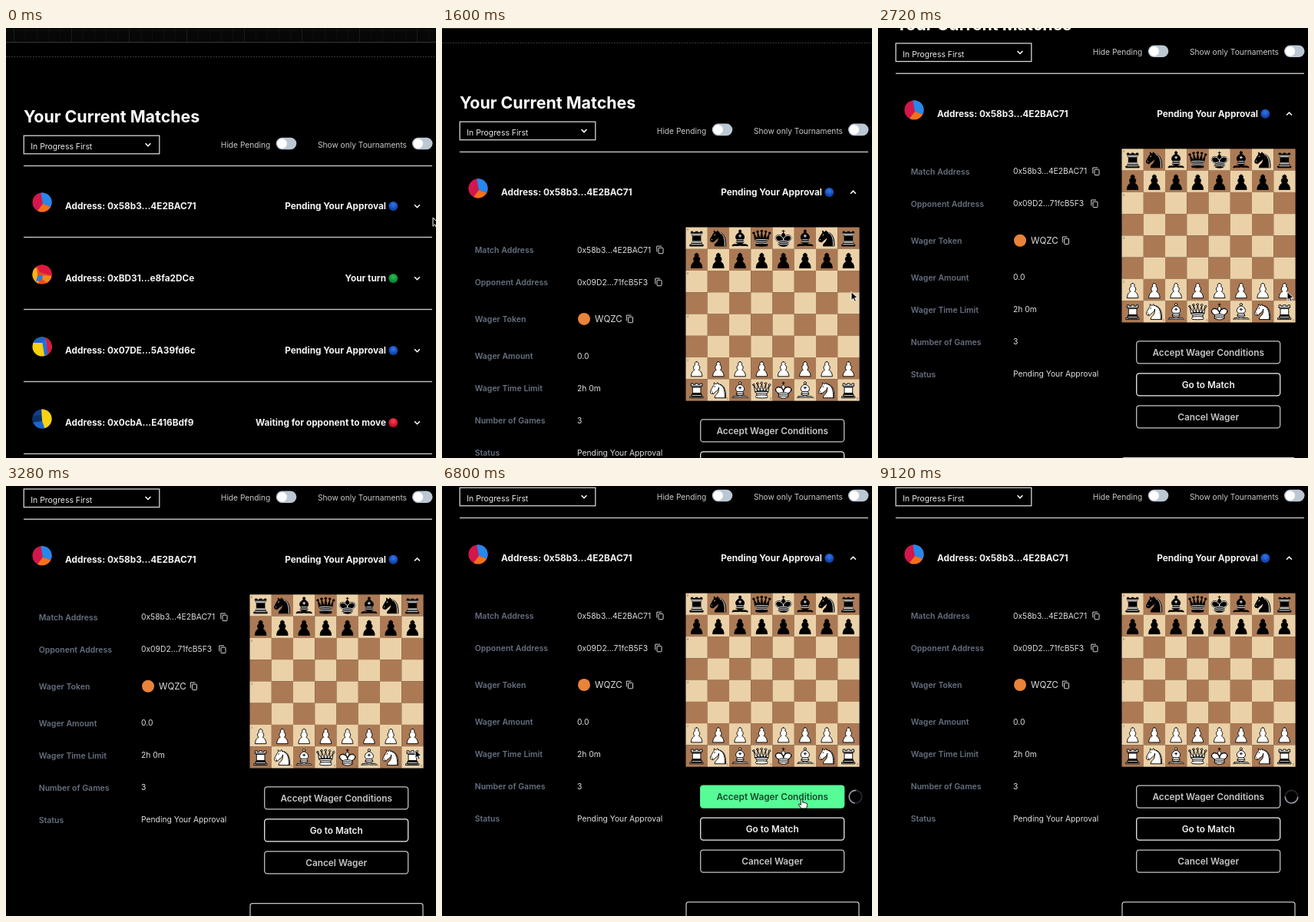
These frames come from a looping animation (560 by 560 pixels, 9200 ms). An HTML page:

```html
<!DOCTYPE html>
<html lang="en">
<head>
<meta charset="utf-8">
<title>Current matches</title>
<style>
  html, body { margin: 0; width: 100%; height: 100%; overflow: hidden; background: #000; }
  svg { display: block; width: 560px; height: 560px; font-family: Inter, sans-serif; }
</style>
</head>
<body>
<svg id="stage" viewBox="0 0 560 560"></svg>
<script>
const LOOP = 9200;
const PANEL_HEIGHT = 500;
const OPEN_AT = 640, OPEN_TIME = 260;
const SPINNER_AT = 5900, SPIN_TIME = 490;
const BOARD = { x: 317.5, y: 277.6, cell: 28.25 };
const BORDER = 1.25;

// Keyframes: [time, ...values]
const scrollKeys = [[1400, 0], [1600, 18], [2080, 62.5], [2720, 120.2], [3000, 134], [3500, 138]];
const cursorKeys = [
  [80, 556, 247], [520, 534, 231], [800, 534, 231], [1280, 533, 343.5],
  [3840, 533, 343.5], [4320, 471, 410.5], [4700, 471, 410.5], [5120, 468.5, 407.5],
  [7600, 468.5, 407.5], [7900, 530, 414], [8320, 566, 476]
];

// y is the optical middle of the capitals
const text = (x, y, size, weight, fill, content, anchor = 'start') =>
  `<text x="${x}" y="${y + size * 0.364}" font-size="${size}" font-weight="${weight}" fill="${fill}" text-anchor="${anchor}">${content}</text>`;
const rect = (x, y, w, h, attrs) => `<rect x="${x}" y="${y}" width="${w}" height="${h}" ${attrs}/>`;
const circle = (x, y, r, attrs) => `<circle cx="${x}" cy="${y}" r="${r}" ${attrs}/>`;
const path = (d, attrs) => `<path d="${d}" ${attrs}/>`;
const rule = y => rect(23, y - 0.7, 532, 1.4, 'fill="#c4c4c4"');
const range = n => [...Array(n).keys()];

const chevron = (x, y, id = '') =>
  `<g transform="translate(${x} ${y})">${path('M-3.4 -1.8L0 1.7L3.4 -1.8', `${id} fill="none" stroke="#fff" stroke-width="1.6"`)}</g>`;

const toggle = (x, y) =>
  rect(x, y - 7.8, 26.5, 15.6, 'rx="7.8" fill="#bcc7d4"') + circle(x + 7.8, y, 6.3, 'fill="#fff"');

const copyIcon = (x, y) => `<g transform="translate(${x} ${y})" fill="none" stroke="#d5d5d5">
  ${rect(-2, -2.6, 6, 7.4, 'rx=".8"')}${path('M-4.2 2.5V-4.8H2', '')}</g>`;

// Avatars: background plus coloured wedges on a disc
const avatars = [
  ['#d3164c', ['#2489ec', 'M-2 -14L1 2L14 7V-14Z'], ['#f4701b', 'M-8 14L1 2L14 7V14Z']],
  ['#ee4a1d', ['#e0183f', 'M-8 -14L-3 -3L14 2V-14Z'], ['#f5b414', 'M-14 -10L-7 -8L-4 14H-14Z'],
    ['#2c7be0', 'M-6 2L1 0L1 7L-8 9Z'], ['#f58a17', 'M1 1L14 2L10 14L0 6Z']],
  ['#f8d00e', ['#1a63d8', 'M-14 -14H6L4 -5L-14 -5Z'], ['#e3173c', 'M4 -14H14V14H4L6 0Z'], ['#1d74e4', 'M0 -8L6 -6L7 10L3 12Z']],
  ['#113f86', ['#f8d311', 'M-1 -14H14V14H3L0 3Z'], ['#1c65cf', 'M-14 3L0 3L4 14H-14Z'], ['#0a3268', 'M-14 -3L-1 -5L0 3L-14 5Z']]
];
const avatar = (index, y) => {
  const [base, ...wedges] = avatars[index];
  return `<g transform="translate(47 ${y})" clip-path="url(#disc)">${circle(0, 0, 13, `fill="${base}"`)}
    ${wedges.map(([fill, d]) => path(d, `fill="${fill}"`)).join('')}</g>`;
};

const rows = [
  ['0x58b3...4E2BAC71', 'Pending Your Approval', 'blue'],
  ['0xBD31...e8fa2DCe', 'Your turn', 'green'],
  ['0x07DE...5A39fd6c', 'Pending Your Approval', 'blue'],
  ['0x0cbA...E416Bdf9', 'Waiting for opponent to move', 'red']
];
const matchRow = ([address, status, color], i) => {
  const y = 232 + i * 94;
  return avatar(i, y - 5) +
    text(77, y, 11.8, 700, '#f4f4f4', 'Address: ' + address) +
    text(495, y, 11.8, 700, '#f4f4f4', status, 'end') +
    circle(504.3, y, 6, `fill="url(#${color})"`) +
    chevron(535.5, y, i ? '' : 'id="flip"');
};

const ball = (id, light, dark) => `<radialGradient id="${id}" cy=".35">
  <stop offset=".2" stop-color="${light}"/><stop offset="1" stop-color="${dark}"/></radialGradient>`;

// Chess pieces on a 45-unit square: [body, inner lines]
const pieces = {
  p: ['M22.5 9c-2.2 0-4 1.8-4 4 0 .9.3 1.7.8 2.4C17.3 16.5 16 18.6 16 21c0 2 .9 3.8 2.4 5-3 1-7.4 5.6-7.4 13.5h23c0-7.9-4.4-12.5-7.4-13.5 1.5-1.2 2.4-3 2.4-5 0-2.4-1.3-4.5-3.3-5.6.5-.7.8-1.5.8-2.4 0-2.2-1.8-4-4-4z', ''],
  r: ['M9 39h27v-3H9zM12 36v-4h21v4zM12.5 32l1.5-2.5h17l1.5 2.5zM14 29.5v-13h17v13zM11 14V9h4v2h5V9h5v2h5V9h4v5l-3 2.5H14z',
    'M12 35.5h21M13 31.5h19M14 29.5h17M14 16.5h17M11 14h23'],
  n: ['M22 10c10.5 1 16.5 8 16 29H15c0-9 10-6.5 8-21M24 18c.4 2.9-5.5 7.4-8 9-3 2-2.8 4.3-5 4-1-.9 1.4-3 0-3-1 0 .2 1.2-1 2-1 0-4 1-4-4 0-2 6-12 6-12s1.9-1.9 2-3.5c-.7-1-.5-2-.5-3 1-1 3 2.5 3 2.5h2s.8-2 2.5-3c1 0 1 3 1 3',
    'M9 25.3v.4M14.5 16.5l.8-1.5M26 11.5c6 2 10.5 9 10 27'],
  b: ['M9 36c3.4-1 10.1.4 13.5-2 3.4 2.4 10.1 1 13.5 2 0 0 1.7.5 3 2-.7 1-1.7 1-3 .5-3.4-1-10.1.5-13.5-1-3.4 1.5-10.1 0-13.5 1-1.4.5-2.3.5-3-.5 1.4-1.5 3-2 3-2zM15 32c2.5 2.5 12.5 2.5 15 0 .5-1.5 0-2 0-2 0-2.5-2.5-4-2.5-4 5.5-1.5 6-11.5-5-15.5-11 4-10.5 14-5 15.5 0 0-2.5 1.5-2.5 4 0 0-.5.5 0 2zM25 8a2.5 2.5 0 1 1-5 0 2.5 2.5 0 1 1 5 0z',
    'M17.5 26h10M15 30h15M22.5 15.5v5M20 18h5'],
  q: ['M9 26c8.5-1.5 21-1.5 27 0l2-12-7 11V11l-5.5 13.5-3-15-3 15-5.5-14V25L7 14zM9 26c0 2 1.5 2 2.5 4 1 1.5 1 1 .5 3.5-1.5 1-1.5 2.5-1.5 2.5-1.5 1.5.5 2.5.5 2.5 6.5 1 16.5 1 23 0 0 0 1.5-1 0-2.5 0 0 .5-1.5-1-2.5-.5-2.5-.5-2 .5-3.5 1-2 2.5-2 2.5-4-8.5-1.5-18.5-1.5-27 0z' +
    [[6, 12], [14, 9], [22.5, 8], [31, 9], [39, 12]].map(([x, y]) => `M${x - 2} ${y}a2 2 0 1 1 4 0a2 2 0 1 1-4 0z`).join(''),
    'M9.5 26.5c8-1.5 18-1.5 26 0M11.5 30c3.5-1 18.5-1 22 0M12 33.5c6-1 15-1 21 0'],
  k: ['M22.5 11.6V6M20 8h5M22.5 25s4.5-7.5 3-10.5c0 0-1-2.5-3-2.5s-3 2.5-3 2.5c-1.5 3 3 10.5 3 10.5M12.5 37c5.5 3.5 14.5 3.5 20 0v-7s9-4.5 6-10.5c-4-6.5-13.5-3.5-16 4V27v-3.5c-2.5-7.5-12-10.5-16-4-3 6 6 10.5 6 10.5z',
    'M32 29.5s8.5-4 6-9.7c-3.9-5.8-13-2.3-15.5 4.7v2.1-2.1c-2.5-7-11.6-10.5-15.5-4.7-2.5 5.7 6 9.7 6 9.7M12.5 30c5.5-3 14.5-3 20 0M12.5 33.5c5.5-3 14.5-3 20 0M12.5 37c5.5-3 14.5-3 20 0']
};
const piece = (kind, white, col, row) => {
  const [body, lines] = pieces[kind];
  const { x, y, cell } = BOARD;
  return `<g transform="translate(${x + col * cell} ${y + row * cell}) scale(${cell / 45})" stroke-width="1.5" stroke-linejoin="round" stroke-linecap="round">
    ${path(body, `fill="${white ? '#fff' : '#000'}" stroke="#000"`)}
    ${path(lines, `fill="none" stroke="${white ? '#000' : '#fff'}"`)}</g>`;
};
const board = () => {
  const { x, y, cell } = BOARD;
  const label = (lx, ly, content) => text(lx, ly, 4, 400, '#8d6c4c', content);
  const squares = range(64).map(i => {
    const col = i % 8, row = i >> 3;
    return rect(x + col * cell, y + row * cell, cell + 0.1, cell + 0.1, `fill="${(col + row) % 2 ? '#ab7a55' : '#ebd1a8'}"`);
  });
  const labels = range(8).map(i =>
    label(x + 1.2, y + i * cell + 3.2, 8 - i) + label(x + (i + 1) * cell - 3.4, y + 8 * cell - 2.8, 'abcdefgh'[i]));
  const men = [...'rnbqkbnr'].map((kind, col) =>
    piece(kind, false, col, 0) + piece('p', false, col, 1) + piece('p', true, col, 6) + piece(kind, true, col, 7));
  return [...squares, ...labels, ...men].join('');
};

const details = [
  [307, 'Match Address', '0x58b3...4E2BAC71', 284],
  [349, 'Opponent Address', '0x09D2...71fcB5F3', 282],
  [397, 'Wager Token', ''],
  [445, 'Wager Amount', '0.0'],
  [487, 'Wager Time Limit', '2h 0m'],
  [529, 'Number of Games', '3'],
  [571, 'Status', 'Pending Your Approval']
];
const detail = ([y, label, value, copyX]) =>
  text(42.7, y, 10.5, 600, '#667080', label) + text(176, y, 10.3, 400, '#dedede', value) +
  (copyX ? copyIcon(copyX, y) : '');

const button = (y, label, color, id) =>
  `<g id="${id}">${rect(336.7, y, 187, 29, `rx="3.5" fill="#000" stroke="${color}" stroke-width="${BORDER}"`)}
  ${text(430.2, y + 14.6, 11.8, 600, color, label, 'middle')}</g>`;

const panel = () => details.map(detail).join('') +
  circle(185, 397, 8, 'fill="#e8833a"') + text(199, 397, 11.6, 400, '#dedede', 'WQZC') + copyIcon(244.5, 397) +
  board() +
  button(528, 'Accept Wager Conditions', '#c6c6c6', 'accept') +
  button(570, 'Go to Match', '#f2f2f2', 'go') +
  button(612, 'Cancel Wager', '#c6c6c6', 'cancel') +
  rect(318, 679.8, 225, 70, `rx="3" fill="none" stroke="#c6c6c6" stroke-width="${BORDER}"`) +
  `<g id="spinner">${circle(0, 0, 8.3, 'fill="none" stroke="#2b2b33" stroke-width="1.6"')}
    ${path('M-5.87 -5.87A8.3 8.3 0 0 1 5.87 5.87', 'fill="none" stroke="#9a9aa6" stroke-width="1.6"')}</g>`;

const header = () =>
  rect(0, -20, 560, 38, 'fill="#070707"') +
  range(38).map(i => rect(10 + i * 15, -20, 1, 38, `fill="#fff" opacity="${i % 5 ? 0.03 : 0.08}"`)).join('') +
  rect(0, 3, 560, 1, 'fill="#fff" opacity=".04"') +
  rect(0, 18, 560, 1, 'fill="#363636"') +
  path('M0 37.5H560', 'stroke="#3c3c3c" stroke-dasharray="2 1.5"') +
  text(23, 115, 21.4, 700, '#fff', 'Your Current Matches') +
  rect(23.2, 140.2, 176.6, 23.6, `fill="none" stroke="#dcdcdc" stroke-width="${BORDER}"`) +
  text(32.3, 154.6, 10.4, 400, '#ececec', 'In Progress First') + chevron(185, 152) +
  text(344.3, 152, 10.2, 400, '#c8c8c8', 'Hide Pending', 'end') + toggle(351.8, 150.5) +
  text(522, 152, 10.2, 400, '#c8c8c8', 'Show only Tournaments', 'end') + toggle(529, 150.5) +
  rule(179.5);

const $ = id => document.getElementById(id);
$('stage').innerHTML = `
  <defs>
    <clipPath id="disc"><circle r="12.6"/></clipPath>
    <clipPath id="reveal"><rect id="revealBox" y="254" width="560"/></clipPath>
    ${ball('blue', '#2c6fe4', '#1145ac')}${ball('green', '#22b94c', '#0b8a35')}${ball('red', '#f23a4c', '#c70f2c')}
  </defs>
  <g id="page">
    ${header()}
    ${matchRow(rows[0], 0)}
    <g clip-path="url(#reveal)">${panel()}</g>
    <g id="below">${rule(272.5)}${rows.slice(1).map((row, i) => matchRow(row, i + 1) + rule(366.5 + i * 94)).join('')}</g>
  </g>
  <g id="cursor" stroke-linejoin="round">
    ${path('M0 0V11.2L2.6 8.8L4.4 12.8L6.3 12L4.6 8.1H8.2Z', 'id="arrow" fill="#000" stroke="#fff"')}
    ${path('M-1.2 1.2Q0 -.8 1.2 1.2V4.6Q2.6 3.7 3.4 5Q4.8 4.4 5.4 5.7Q7.2 5.4 7.2 7V9Q6.6 11 6 12.4H-.6L-4 7.8Q-4 6 -2.4 6.8L-1.2 8Z', 'id="hand" fill="#fff" stroke="#000" stroke-width=".9"')}
  </g>`;

const acceptBox = $('accept').querySelector('rect');
const acceptText = $('accept').querySelector('text');
const clamp = v => Math.min(1, Math.max(0, v));
const smooth = v => v * v * (3 - 2 * v);

function sample(keys, t, ease = v => v) {
  const next = keys.findIndex(key => key[0] > t);
  if (next === 0) return keys[0].slice(1);
  if (next < 0) return keys[keys.length - 1].slice(1);
  const a = keys[next - 1], b = keys[next];
  const k = ease((t - a[0]) / (b[0] - a[0]));
  return a.slice(1).map((v, i) => v + (b[i + 1] - v) * k);
}

function draw(t) {
  const [scroll] = sample(scrollKeys, t);
  const [x, y] = sample(cursorKeys, t, smooth);
  const open = smooth(clamp((t - OPEN_AT) / OPEN_TIME));
  const pageY = y + scroll;
  const onAccept = x > 336 && x < 524 && pageY > 527 && pageY < 557;
  const onChevron = x < 550 && pageY > 190 && pageY < 272;
  const pointing = onAccept || onChevron;

  $('page').setAttribute('transform', `translate(0 ${-scroll})`);
  $('below').setAttribute('transform', `translate(0 ${open * PANEL_HEIGHT})`);
  $('revealBox').setAttribute('height', open * (PANEL_HEIGHT + 18));
  $('flip').setAttribute('transform', `rotate(${-180 * open})`);
  acceptBox.setAttribute('fill', onAccept ? '#56fc96' : '#000');
  acceptBox.setAttribute('stroke', onAccept ? '#56fc96' : '#c6c6c6');
  acceptText.setAttribute('fill', onAccept ? '#164a2b' : '#c6c6c6');
  $('spinner').setAttribute('visibility', t >= SPINNER_AT ? 'visible' : 'hidden');
  $('spinner').setAttribute('transform', `translate(538.5 542.7) rotate(${t / SPIN_TIME * 360 - 85})`);
  $('cursor').setAttribute('transform', `translate(${x} ${y})`);
  $('arrow').setAttribute('visibility', pointing ? 'hidden' : 'visible');
  $('hand').setAttribute('visibility', pointing ? 'visible' : 'hidden');
}

const start = performance.now();
function tick() {
  draw((performance.now() - start) % LOOP);
  requestAnimationFrame(tick);
}
tick();
</script>
</body>
</html>
```
